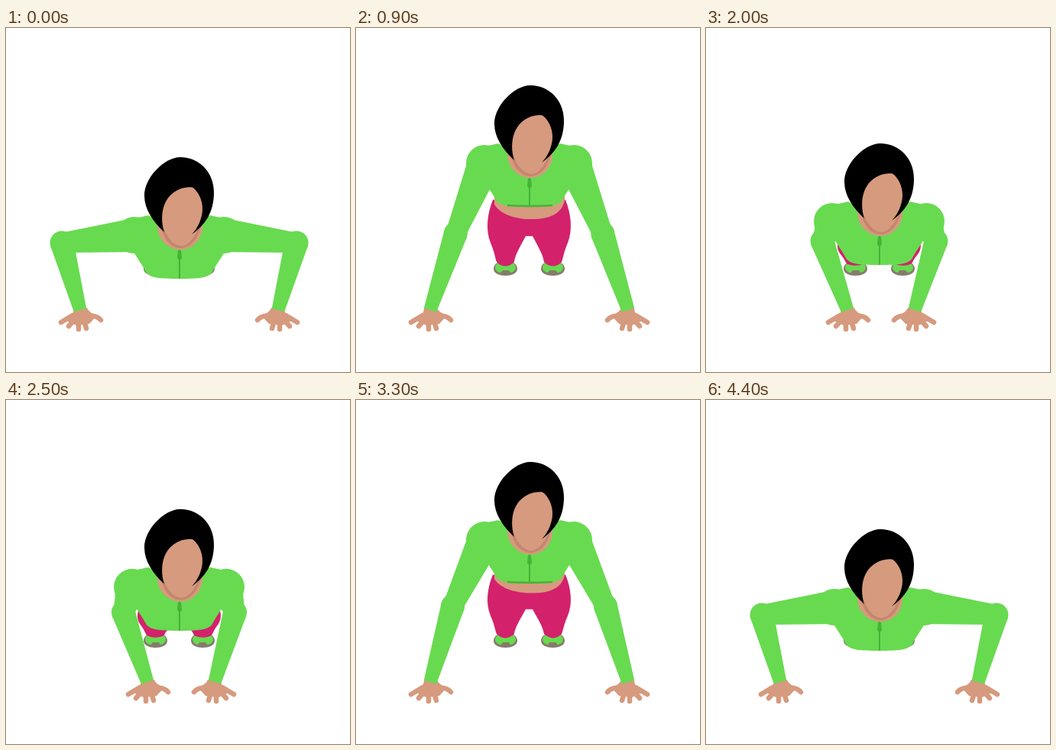
These frames come from a looping animation (450x450 px, 4500 ms). An HTML page without scripts:

```html
<!DOCTYPE html>
<html lang="en">
<head>
<meta charset="utf-8">
<title>Push-ups</title>
<style>
  @property --t { syntax: "<number>"; inherits: true; initial-value: 0; }

  html, body { margin: 0; width: 100%; height: 100%; overflow: hidden; background: #fff; }

  /* --t counts tenths of a second; every ramp is a cosine ease from 0 to 1 */
  svg {
    display: block; width: 100vw; height: 100vh;
    --green: #68da50; --dark: #45b336; --skin: #d69a7e; --pink: #d3216b; --sole: #857b6b;
    animation: clock 4.5s steps(45) infinite;
    --rise-wide: calc(.5 - .5 * cos(pi * clamp(0, (var(--t) - 2.75) / 7.3, 1)));
    --fall-narrow: calc(.5 - .5 * cos(pi * clamp(0, (var(--t) - 10.92) / 8.16, 1)));
    --rise-narrow: calc(.5 - .5 * cos(pi * clamp(0, (var(--t) - 23.5) / 7.3, 1)));
    --fall-wide: calc(.5 - .5 * cos(pi * clamp(0, (var(--t) - 30.5) / 11.5, 1)));
    --hands-in: calc(.5 - .5 * cos(pi * clamp(0, (var(--t) - 9) / 3, 1)));
    --hands-out: calc(.5 - .5 * cos(pi * clamp(0, (var(--t) - 29) / 3, 1)));
    --lift: calc(99 * (var(--rise-wide) - var(--fall-wide)) + 81 * (var(--rise-narrow) - var(--fall-narrow)));
    --grip: calc(var(--hands-in) - var(--hands-out));
  }
  @keyframes clock { to { --t: 45; } }

  .body { transform: translateY(calc(var(--lift) * -1px)); }
  .legs { transform-origin: 0 310px; transform: scaleY(calc(.35 + var(--lift) * .00657)); }
  .hem { opacity: calc((var(--lift) - 20) / 60); }

  /* Shoulder, elbow and wrist follow from the body's lift and the hands' grip */
  .side {
    fill: var(--green);
    --slide: calc(var(--reach) * var(--grip));
    --sx: calc(168 - 3 * var(--grip));
    --sy: calc(271 - var(--lift));
    --ex: calc(73 + .61 * var(--lift) + var(--grip) * (76 - .44 * var(--lift)));
    --ey: calc(281 - .13 * var(--lift));
    --wx: calc(97 + var(--slide));
    --wy: 369;
  }
  .hand { transform: translateX(calc(var(--slide) * 1px)); }
  .shoulder { transform: translate(calc(var(--sx) * 1px), calc(var(--sy) * 1px)); }
  .elbow { transform: translate(calc(var(--ex) * 1px), calc(var(--ey) * 1px)); }
  .upper { --dx: calc(var(--ex) - var(--sx)); --dy: calc(var(--ey) - var(--sy)); }
  .fore { --dx: calc(var(--wx) - var(--ex)); --dy: calc(var(--wy) - var(--ey)); }
  .bone { transform: rotate(atan2(var(--dy), var(--dx))) scaleX(hypot(var(--dx), var(--dy))); }
</style>
</head>
<body>
<svg viewBox="0 0 450 450">
  <defs>
    <g id="shoe">
      <path d="M180 315C180 301 211 301 211 315C211 327 180 327 180 315Z" fill="var(--sole)"/>
      <path d="M182 313C183 302 208 302 209 313C209 324 182 324 182 313Z" fill="var(--green)"/>
      <path d="M192 317H200L203 322H188Z" fill="var(--sole)"/>
    </g>
    <g id="hand" fill="var(--skin)">
      <path d="M89 366H106C108 371 113 374 119 376L109 387 92 389 79 383C86 377 89 372 89 366Z"/>
      <path d="M87 376L72 385M90 381L82 390M95 384V394M102 383L105 393M106 377Q118 375 124 382" fill="none" stroke="var(--skin)" stroke-width="6.500" stroke-linecap="round"/>
    </g>
    <path id="upper-arm" class="bone" d="M0 -22L1 -13V13L0 22Z"/>
    <path id="forearm" class="bone" d="M0 -15.500L1 -8.500V8.500L0 15.500Z"/>
  </defs>

  <use href="#shoe"/>
  <use href="#shoe" transform="translate(453) scale(-1 1)"/>

  <g class="legs">
    <path d="M179 222C172 240 169 262 176 280C181 292 182 300 184 306Q195 317 207 306C208 298 212 290 222 271H231C241 290 245 298 246 306Q258 317 269 306C271 300 272 292 277 280C284 262 281 240 274 222Z" fill="var(--pink)"/>
    <path d="M181 205V228C190 244 215 249 235 248C255 247 270 240 273 222V205Z" fill="var(--skin)"/>
  </g>

  <g class="side" style="--reach: 88">
    <use class="hand" href="#hand"/>
    <g class="shoulder"><circle r="24"/><g class="upper"><use href="#upper-arm"/></g></g>
    <g class="elbow"><circle r="15.500"/><g class="fore"><use href="#forearm"/></g></g>
  </g>
  <g transform="translate(453) scale(-1 1)">
    <g class="side" style="--reach: 83">
      <use class="hand" href="#hand"/>
      <g class="shoulder"><circle r="24"/><g class="upper"><use href="#upper-arm"/></g></g>
      <g class="elbow"><circle r="15.500"/><g class="fore"><use href="#forearm"/></g></g>
    </g>
  </g>

  <g class="body">
    <path d="M198 257C193 249 188 243 182 246L168 249 166 291C172 302 179 311 183 319C188 327 200 328 227 328C253 328 265 327 270 319C274 311 281 302 287 291L285 249 271 246C265 243 260 249 257 257Z" fill="var(--green)"/>
    <g fill="none" stroke="var(--dark)">
      <path class="hem" d="M198 326Q227 328 257 326" stroke-width="2.500"/>
      <path d="M227 290V328" stroke-width="2"/>
    </g>
    <path d="M225 291H229L230 301Q227 307 224 301Z" fill="var(--dark)"/>
    <path d="M198 254C196 278 214 290 228 290C243 290 259 278 257 254Z" fill="var(--skin)"/>
    <path d="M203 262C208 280 218 288 229 288C241 287 250 278 255 260Z" fill="#c4866c"/>
    <path d="M203 245C204 262 214 285 230 285C243 285 257 258 257 236C257 218 250 204 242 204C222 204 202 222 203 245Z" fill="var(--skin)"/>
    <path d="M228 169C207 169 181 196 181 219C181 237 192 253 207 267C203 254 202 235 213 221C222 210 236 207 244 208.500C252 214 257 226 257 236C257 250 250 263 243 270C260 258 272 242 272 215C272 189 253 169 228 169Z"/>
  </g>
</svg>
</body>
</html>
```
